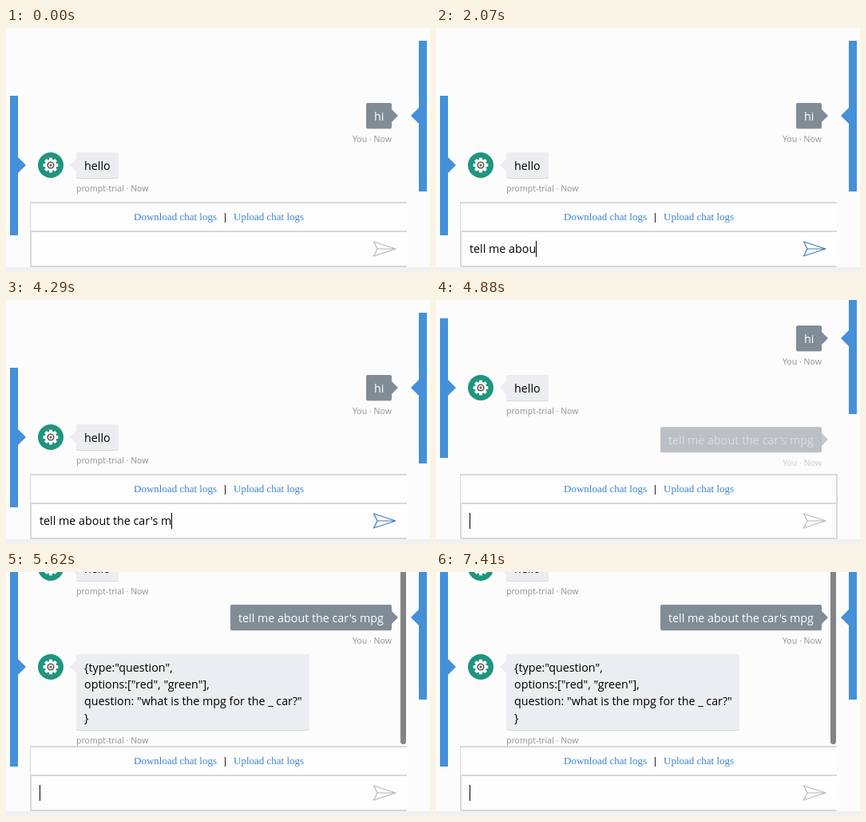
These frames come from a looping animation (531 px wide and 306 px high, 8000 ms). An HTML page with a canvas:

```html
<!DOCTYPE html>
<html lang="en">
<head>
<meta charset="utf-8">
<title>Chat</title>
<style>
html, body { margin: 0; width: 100%; height: 100%; overflow: hidden; background: #fcfcfc; }
canvas { display: block; }
</style>
</head>
<body>
<canvas id="stage" width="531" height="306"></canvas>
<script>
const ctx = document.getElementById('stage').getContext('2d');
const LOOP = 8000;
const SANS = '"Open Sans", "Noto Sans", sans-serif';
const BODY = `14.3px ${SANS}`;
const META = `10.6px ${SANS}`;
const LINK = '13px "Liberation Serif", serif';
const BLUE = '#4590d8';
const BOT = 'prompt-trial · Now';
const YOU = 'You · Now';
const QUERY = "tell me about the car's mpg";
const REPLY = [
  '{type:"question",',
  'options:["red", "green"],',
  'question: "what is the mpg for the _ car?"',
  '}'
];

// Each track is a list of [start time, value].
const typed = [[0, 0], [740, 1], [890, 2], [1040, 4], [1190, 5], [1340, 6], [1490, 7],
  [1630, 8], [1780, 9], [1920, 10], [2070, 12], [2220, 13], [2370, 14], [2520, 16],
  [2670, 18], [2810, 19], [2960, 20], [3260, 21], [3560, 22], [3700, 23], [4000, 24],
  [4150, 25], [4300, 26], [4440, 27], [4880, 0]];
const caretOn = [[0, false], [290, true], [5330, false], [5620, true], [6070, false],
  [6520, true], [6960, false], [7410, true]];
const queryAlpha = [[0, 0], [4880, 0.45], [5030, 1]];
const replyAlpha = [[0, 0], [5330, 0.23], [5470, 0.7], [5620, 1]];
const scrollTop = [[0, 0], [4880, 62], [5330, 177]];
const leftBar = [[0, [85, 175, 172]], [4880, [23, 175, 110]], [5330, [23, 249, 148]],
  [5470, [-5, 249, 119]]];
const rightBar = [[0, 110], [4880, 48], [5330, 57]];

function at(track, t) {
  let value = track[0][1];
  for (const [start, v] of track) if (t >= start) value = v;
  return value;
}

function rect(x, y, w, h, color) {
  ctx.fillStyle = color;
  ctx.fillRect(x, y, w, h);
}

function roundRect(x, y, w, h, r, color) {
  ctx.fillStyle = color;
  ctx.beginPath();
  ctx.roundRect(x, y, w, h, r);
  ctx.fill();
}

function disc(x, y, r, color) {
  ctx.fillStyle = color;
  ctx.beginPath();
  ctx.arc(x, y, r, 0, Math.PI * 2);
  ctx.fill();
}

function text(str, x, y, font, color, align = 'left') {
  ctx.font = font;
  ctx.fillStyle = color;
  ctx.textAlign = align;
  ctx.fillText(str, x, y);
}

function pointer(base, tip, y, half, color) {
  ctx.fillStyle = color;
  ctx.beginPath();
  ctx.moveTo(base, y - half);
  ctx.lineTo(tip, y);
  ctx.lineTo(base, y + half);
  ctx.fill();
}

function avatar(y) {
  disc(56, y, 16, '#1f957f');
  ctx.save();
  ctx.translate(56, y);
  for (let i = 0; i < 8; i++) {
    rect(-2, -9.3, 4, 5, '#fff');
    ctx.rotate(Math.PI / 4);
  }
  ctx.restore();
  disc(56, y, 7.3, '#fff');
  disc(56, y, 4.6, '#5c5750');
  disc(56, y, 3, '#fff');
  disc(56, y, 1.6, '#5c5750');
}

function userMessage(str, x, y) {
  roundRect(x, y + 1, 483 - x, 32, 2, '#d3d6d9');
  roundRect(x, y, 483 - x, 32, 2, '#808c96');
  pointer(483, 491, y + 16, 8, '#808c96');
  text(str, x + 10, y + 22, BODY, '#fff');
  text(YOU, 483, y + 49, META, '#929292', 'right');
}

function botMessage(lines, y, w, h) {
  avatar(y + 16);
  roundRect(88, y + 1, w, h, 2, '#d6d9dd');
  roundRect(88, y, w, h, 2, '#ebedf1');
  pointer(88, 80, y + 16, 8, '#ebedf1');
  lines.forEach((line, i) => text(line, 98, y + 22 + i * 21, BODY, '#000'));
  text(BOT, 88, y + h + 17, META, '#929292');
}

function drawChat(t) {
  const qa = at(queryAlpha, t), ra = at(replyAlpha, t);
  const querySlide = 5 * (1 - qa);
  const replySlide = ra > 0 ? 5 * (1 - ra) : 0;
  const scroll = at(scrollTop, t) + Math.round(replySlide);

  ctx.save();
  ctx.beginPath();
  ctx.rect(0, 0, 531, 218);
  ctx.clip();
  ctx.translate(0, -scroll);
  userMessage('hi', 451, 94);
  botMessage(['hello'], 156, 53, 32);
  ctx.globalAlpha = qa;
  if (qa) userMessage(QUERY, 281, 218 + Math.round(querySlide));
  ctx.globalAlpha = ra;
  if (ra) botMessage(REPLY, 280 + Math.round(replySlide), 292, 95);
  ctx.restore();

  if (ra) roundRect(494, -8, 7, 224, 3.5, '#838383');
}

function drawBars(t) {
  const [top, height, tip] = at(leftBar, t);
  rect(5, top, 10, height, BLUE);
  pointer(15, 25, tip, 10, BLUE);
  const y = at(rightBar, t);
  rect(517, y - 94, 10, y === 57 ? 197 : 189, BLUE);
  pointer(517, 507, y, 10, BLUE);
}

function drawSend(color) {
  ctx.strokeStyle = color;
  ctx.lineWidth = 1.2;
  ctx.lineJoin = 'round';
  ctx.beginPath();
  ctx.moveTo(460.5, 268);
  ctx.lineTo(488, 277);
  ctx.lineTo(460.5, 286);
  ctx.lineTo(465, 277);
  ctx.closePath();
  ctx.lineTo(465, 277);
  ctx.lineTo(488, 277);
  ctx.stroke();
}

function drawPanel(t) {
  const line = '#d9d9d9';
  rect(30, 218, 472, 82, '#fdfdfd');
  rect(30, 218, 472, 2, line);
  rect(30, 254, 472, 2, line);
  rect(30, 298, 472, 2, line);
  rect(30, 218, 1, 82, line);
  rect(30, 254, 2, 46, line);
  if (t >= 4880 && t < 5620) rect(501, 218, 2, 82, line);
  rect(0, 300, 531, 6, '#f1f1f1');

  text('Download chat logs', 160, 241, LINK, '#3f82d8');
  text('Upload chat logs', 285, 241, LINK, '#3f82d8');
  rect(274, 232, 1, 12, '#222');

  const entry = QUERY.slice(0, at(typed, t));
  text(entry, 42, 282, BODY, '#000');
  if (at(caretOn, t)) {
    rect(42 + Math.round(ctx.measureText(entry).width), 267, 1, 20, '#000');
  }
  drawSend(entry ? '#3f7fb8' : '#b8b8b8');
}

function frame(now) {
  const t = now % LOOP;
  rect(0, 0, 531, 306, '#fcfcfc');
  drawChat(t);
  drawBars(t);
  drawPanel(t);
  requestAnimationFrame(frame);
}
frame(0);
</script>
</body>
</html>
```
